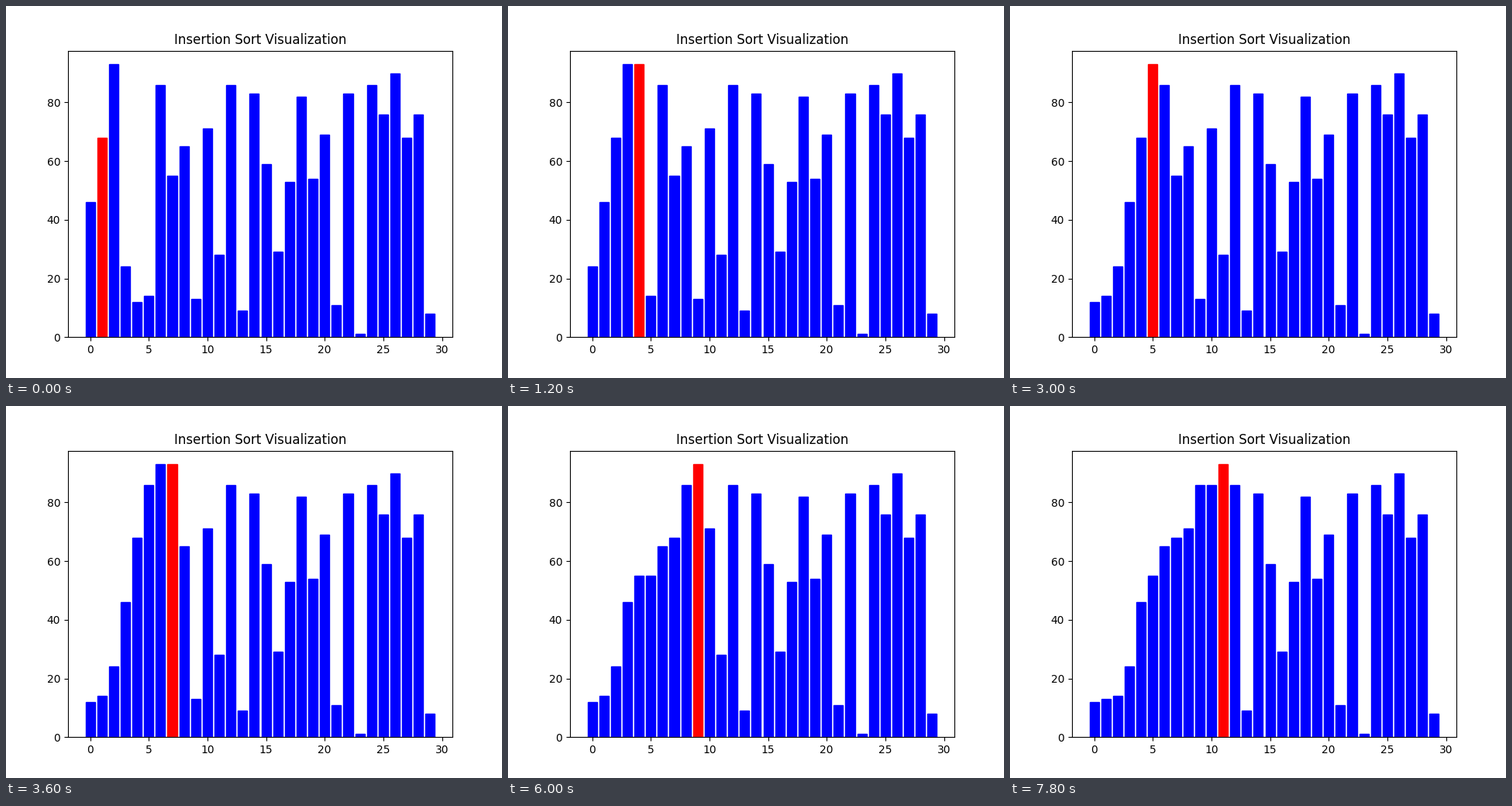
A matplotlib script that plays this animation: 640x480 px, repeating every 8000 ms.

```python
from itertools import islice

import matplotlib.pyplot as plt
from matplotlib.animation import FuncAnimation

FRAMES = 40
INTERVAL = 200  # ms

# The unsorted input; every later state follows from the algorithm.
VALUES = [46, 68, 93, 24, 12, 14, 86, 55, 65, 13,
          71, 28, 86, 9, 83, 59, 29, 53, 82, 54,
          69, 11, 83, 1, 86, 76, 90, 68, 76, 8]


def insertion_sort(values):
    """Yield (array, active index) after every shift and every insertion."""
    a = list(values)
    for i in range(1, len(a)):
        key, j = a[i], i
        while j > 0 and a[j - 1] > key:
            a[j] = a[j - 1]
            j -= 1
            yield a[:], i
        a[j] = key
        yield a[:], i


steps = list(islice(insertion_sort(VALUES), FRAMES))

fig, ax = plt.subplots(figsize=(6.4, 4.8), dpi=100)
ax.set_title("Insertion Sort Visualization")
bars = ax.bar(range(len(VALUES)), VALUES)


def update(n):
    heights, active = steps[n]
    for k, (bar, height) in enumerate(zip(bars, heights)):
        bar.set_height(height)
        bar.set_color("red" if k == active else "blue")
    return bars


anim = FuncAnimation(fig, update, frames=FRAMES, interval=INTERVAL,
                     repeat=True, repeat_delay=0, blit=False)
plt.show()
```
